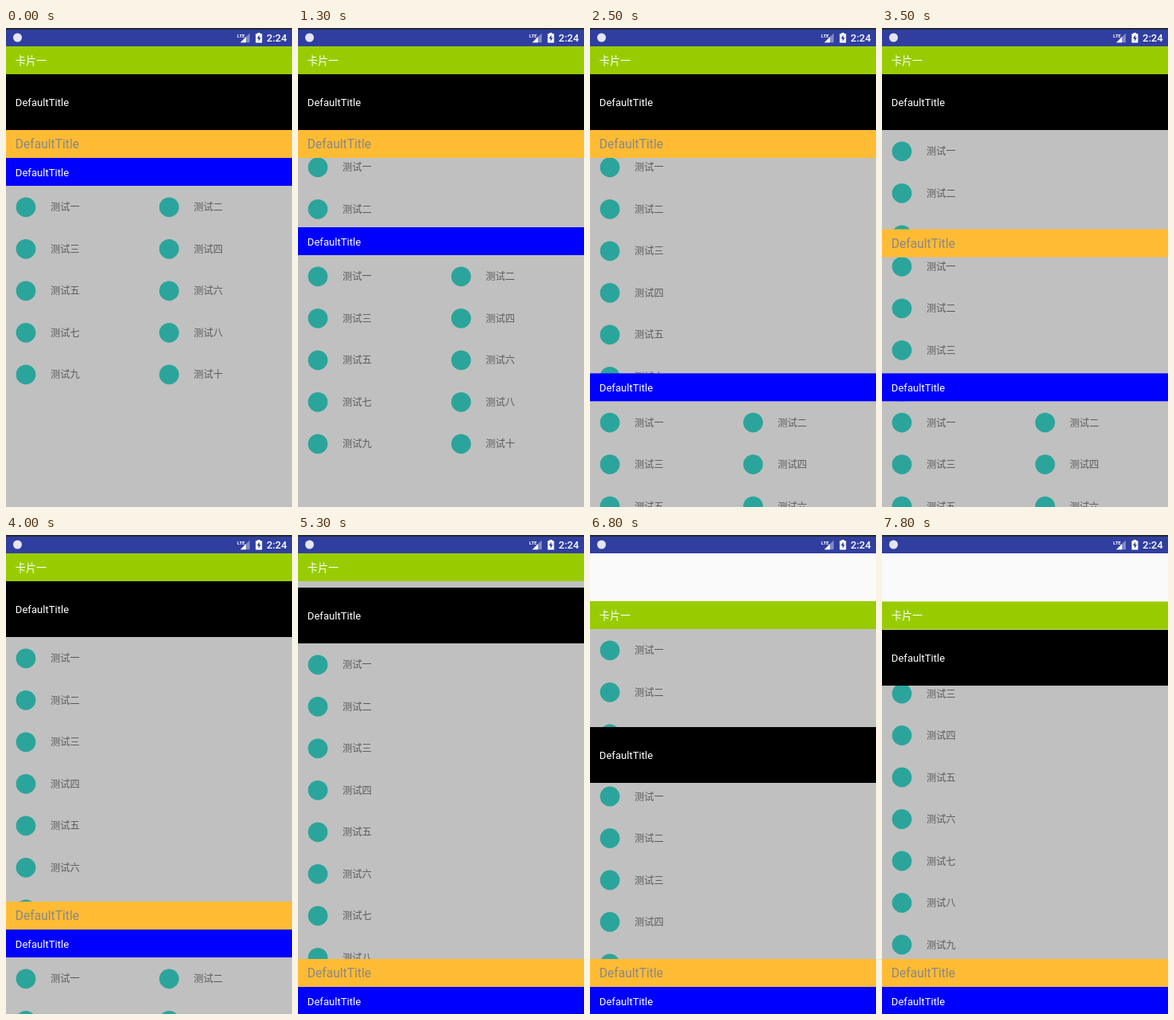
These frames come from a looping animation (360 by 601 pixels, 8 s). An HTML page:

```html
<!DOCTYPE html>
<html lang="zh-CN">
<head>
<meta charset="utf-8">
<title>Sliding cards</title>
<style>
  html, body { margin: 0; width: 100%; height: 100%; overflow: hidden; background: #fafafa; }
  #stage { display: block; width: 360px; height: 601px; }
  text { font-family: Roboto, 'Noto Sans CJK SC', 'Noto Sans CJK', sans-serif; }
</style>
</head>
<body>
<svg id="stage" viewBox="0 0 360 601">
  <rect width="360" height="601" fill="#fafafa"/>
  <g id="cards"></g>
  <g id="status" fill="#fff">
    <rect width="360" height="23" fill="#303f9f"/>
    <rect width="360" height="2" fill="#25272f"/>
    <circle cx="14.5" cy="12" r="5.5" fill="#e3e6f4"/>
    <path d="M295 18.3L306.8 6.5V18.3Z" opacity=".4"/>
    <path d="M295 18.3L302 11.3V18.3Z"/>
    <text x="291" y="11.5" font-size="6" font-weight="700">LTE</text>
    <path d="M314.3 7.3H316.5V6H320V7.3H322.3V18.4H314.3Z"/>
    <path d="M319 8.8L315.8 13.3H317.8V16.8L320.9 12.2H319Z" fill="#303f9f"/>
    <text x="328" y="17.4" font-size="13" font-weight="500">2:24</text>
  </g>
</svg>
<script>
const NS = 'http://www.w3.org/2000/svg';
const LOOP = 8000, STEP = 100, ROW = 52.5, FIRST = 26.8;
const DIGITS = [...'一二三四五六七八九十'];

// Header look, and [time, value] keys for its top edge and its list scroll
const cards = [
  { title: '卡片一', h: 35, fill: '#99cc00', ink: '#fff', size: 13.1, cols: 1,
    top: [[6400, 23], [6800, 83], [7500, 83], [7600, 83.5]], scroll: [[0, 0]] },
  { title: 'DefaultTitle', h: 70, fill: '#000', ink: '#fff', size: 13.1, cols: 1,
    top: [[5200, 58], [5300, 66], [5900, 241], [7500, 241], [7800, 119]],
    scroll: [[5300, 0], [5900, 9.8], [7500, 9.8], [7800, 121.8]] },
  { title: 'DefaultTitle', h: 35, fill: '#ffbb33', ink: '#888', size: 15.6, cols: 1,
    top: [[3200, 128], [4000, 460], [4100, 496], [4300, 532]], scroll: [[0, 15]] },
  { title: 'DefaultTitle', h: 35, fill: '#0000ff', ink: '#fff', size: 13.1, cols: 2,
    top: [[800, 163], [1300, 250], [1700, 327], [2500, 433.3]], scroll: [[0, 0]] }
];

function add(parent, tag, attrs, text) {
  const el = document.createElementNS(NS, tag);
  for (const k in attrs) el.setAttribute(k, attrs[k]);
  if (text) el.textContent = text;
  return parent.appendChild(el);
}

function build(card) {
  card.el = add(document.getElementById('cards'), 'g', {});
  const view = add(card.el, 'svg', { y: card.h, width: 360, height: 601, overflow: 'hidden' });
  add(view, 'rect', { width: 360, height: 601, fill: '#c0c0c0' });
  card.list = add(view, 'g', {});
  DIGITS.forEach((d, i) => {
    const x = i % card.cols * 180.3;
    const y = FIRST + Math.floor(i / card.cols) * ROW;
    add(card.list, 'circle', { cx: 25 + x, cy: y, r: 12.4, fill: '#2ba59b' });
    add(card.list, 'text', { x: 56 + x, y: y + 4.6, 'font-size': 12.25, fill: '#5c5c5c' }, '测试' + d);
  });
  add(card.el, 'rect', { width: 360, height: card.h, fill: card.fill });
  add(card.el, 'text', { x: 11.8, y: card.h / 2 + card.size * .342 + .6,
    'font-size': card.size, fill: card.ink }, card.title);
}

function at(keys, t) {
  const i = keys.findIndex(k => k[0] > t);
  if (i < 0) return keys[keys.length - 1][1];
  if (i === 0) return keys[0][1];
  const [t0, a] = keys[i - 1], [t1, b] = keys[i];
  return a + (b - a) * (t - t0) / (t1 - t0);
}

const shift = (el, y) => el.setAttribute('transform', `translate(0 ${y})`);

function render(t) {
  let edge = 0;
  for (const c of cards) {
    // A header pushes the next ones down
    const y = Math.max(at(c.top, t), edge);
    edge = y + c.h;
    shift(c.el, y);
    shift(c.list, -at(c.scroll, t));
  }
}

function tick() {
  const t = performance.now() % LOOP;
  render(Math.floor(t / STEP) * STEP);
  requestAnimationFrame(tick);
}

cards.forEach(build);
tick();
</script>
</body>
</html>
```
